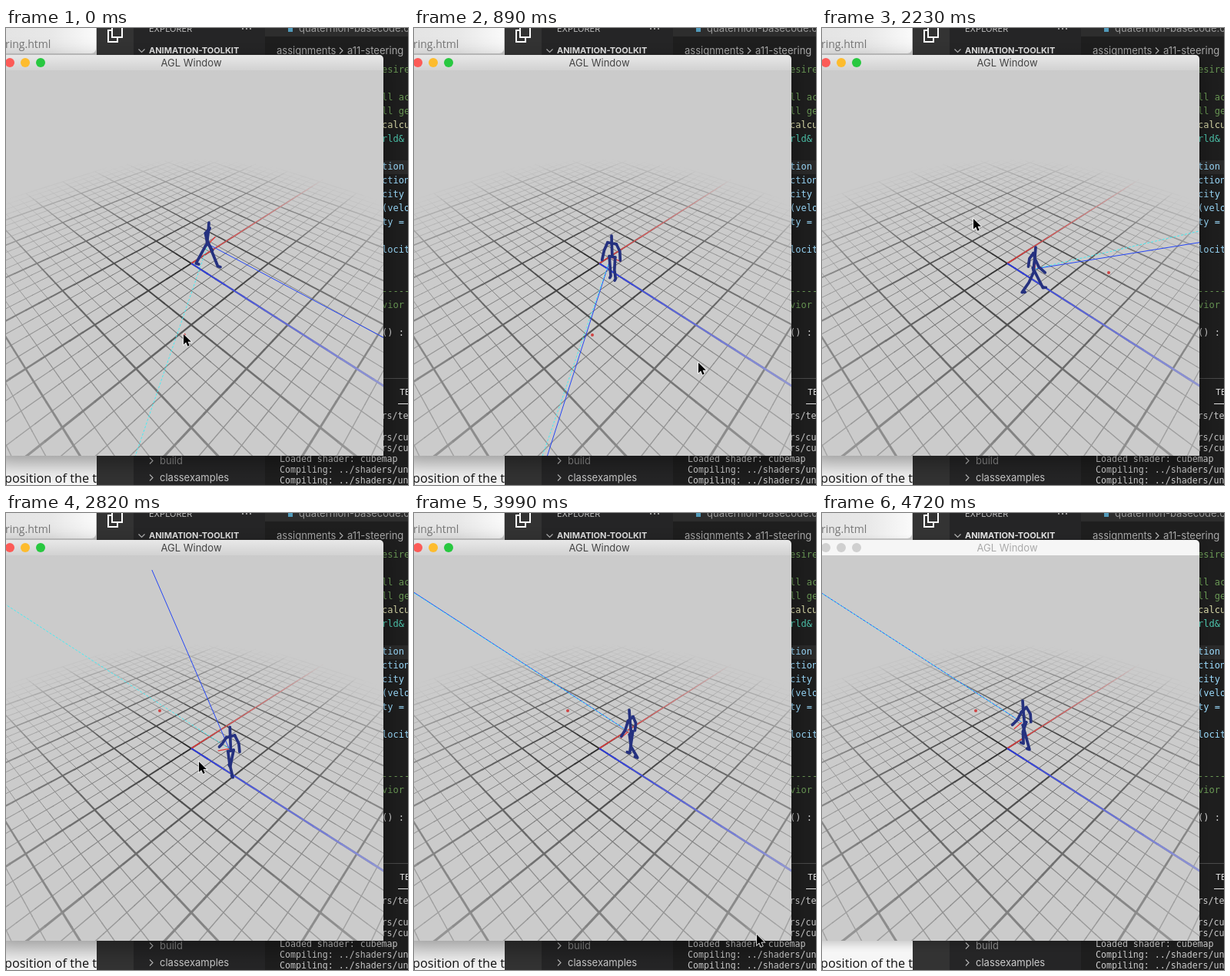
An HTML page with a canvas for the animation above (4820 ms loop, 523 by 594 pixels).

```html
<!DOCTYPE html>
<html lang="en">
<head>
<meta charset="utf-8">
<title>Steering demo</title>
<style>
  html, body { margin: 0; width: 100%; height: 100%; overflow: hidden; background: #1e1e1e; }
  canvas { display: block; }
</style>
</head>
<body>
<canvas id="stage" width="523" height="594"></canvas>
<script>
const W = 523, H = 594, LOOP = 4820;
const SANS = '"Inter", sans-serif', MONO = '"DejaVu Sans Mono", monospace';
const stage = document.getElementById('stage').getContext('2d');
let g = stage;

// Key poses: step, head x, head y, cursor x, cursor y
const keys = [
  [0, 264, 251, 231, 398], [6, 257, 268, 370, 435], [10, 253, 281, 372, 317],
  [15, 278, 283, 197, 248], [23, 298, 267, 350, 431], [27, 280, 254, 446, 548],
  [32, 261, 242, 520, 640]];

// Each click sets a target; the walker then turns toward it
const goals = [
  { step: -1, target: [232, 399], angle: 109 },
  { step: 10, target: [373, 318], angle: -12.9 },
  { step: 17, target: [200, 257], angle: -147.2 }];

// Hermite curve through the key poses
function poseAt(n) {
  const last = keys.length - 1;
  let i = 0;
  while (i < last - 1 && keys[i + 1][0] <= n) i++;
  const a = keys[i], b = keys[i + 1], span = b[0] - a[0], p = (n - a[0]) / span;
  const slope = (k, j) => {
    const u = keys[Math.max(0, k - 1)], v = keys[Math.min(last, k + 1)];
    return span * (v[j] - u[j]) / (v[0] - u[0]);
  };
  return [1, 2, 3, 4].map(j => {
    const d = b[j] - a[j], s = slope(i, j), e = slope(i + 1, j);
    return a[j] + p * (s + p * (3 * d - 2 * s - e + p * (s + e - 2 * d)));
  });
}

function headingAt(n) {
  let angle = 28;
  goals.forEach((goal, i) => {
    const until = Math.min(n, goals[i + 1]?.step ?? n);
    const steps = until - Math.max(0, goal.step);
    if (steps > 0) angle = goal.angle + (angle - goal.angle) * 0.5 ** steps;
  });
  return angle;
}

function rect(x, y, w, h, fill) {
  g.fillStyle = fill;
  g.fillRect(x, y, w, h);
}

function text(str, x, y, color, font, align = 'left') {
  g.fillStyle = color;
  g.font = font;
  g.textAlign = align;
  g.fillText(str, x, y);
}

function line(points, color, width = 1) {
  g.strokeStyle = color;
  g.lineWidth = width;
  g.beginPath();
  points.forEach(p => g.lineTo(p[0], p[1]));
  g.stroke();
}

function dot(x, y, r, fill) {
  g.fillStyle = fill;
  g.beginPath();
  g.arc(x, y, r, 0, 7);
  g.fill();
}

function gradient(x1, y1, x2, y2, ...colors) {
  const fill = g.createLinearGradient(x1, y1, x2, y2);
  colors.forEach((c, i) => fill.addColorStop(i / (colors.length - 1), c));
  return fill;
}

function chevron(x, y, down) {
  line(down ? [[x - 4, y - 2], [x, y + 2], [x + 4, y - 2]]
            : [[x - 2, y - 4], [x + 2, y], [x - 2, y + 4]], '#b8b8b8', 1.1);
}

function layer(paint) {
  const c = document.createElement('canvas');
  c.width = W;
  c.height = H;
  g = c.getContext('2d');
  paint();
  g = stage;
  return c;
}

function paintDesktop() {
  rect(0, 0, 118, H, '#f6f6f6');
  rect(0, 0, 118, 36, '#c8c8c8');
  g.beginPath();
  g.roundRect(-20, -20, 137, 53, 6);
  g.fillStyle = gradient(0, 0, 117, 0, '#e4e4e4', '#e8e8e8', '#fafafa');
  g.fill();
  text('ring.html', -1, 26, '#777', '14px "Open Sans", sans-serif');
  text('position of the t', 118, 591, '#111', '16.3px "Open Sans", sans-serif', 'right');

  rect(118, 0, 48, H, '#333333');
  rect(166, 0, 171, H, '#252526');
  rect(337, 0, 186, H, '#1e1e1e');
  rect(337, 0, 186, 11, '#2d2d2d');
  g.strokeStyle = '#fff';
  g.lineWidth = 2;
  g.strokeRect(138, -4, 13, 16);
  line([[138, 3], [133, 3], [133, 18], [145, 18], [145, 12]], '#fff', 2);

  text('EXPLORER', 186, 5, '#bbb', '11px ' + SANS);
  for (let x = 308; x < 320; x += 5) dot(x, 1, 1, '#bbb');
  chevron(176.5, 29.5, true);
  text('ANIMATION-TOOLKIT', 186, 33, '#e4e4e4', 'bold 11px ' + SANS);
  rect(367, 0, 6, 5, '#519aba');
  text('quaternion-basecode.cpp', 381, 5, '#999', '13px ' + SANS);
  text('assignments', 352, 34, '#a9a9a9', '13px ' + SANS);
  chevron(436, 29.5);
  text('a11-steering', 444, 34, '#a9a9a9', '13px ' + SANS);

  rect(491, 172, 32, 18, '#2a2a2a');
  const code = 'esire||ll ac|ll ge|calcu|rld&||tion|ction|city|(velo|ty =||locit|||-----|vior||() :';
  code.split('|').forEach((s, i) => {
    const color = i < 4 || i === 16 || i === 17 ? '#6a9955'
      : i === 4 ? '#dcdcaa' : i === 5 ? '#4ec9b0' : i < 16 ? '#9cdcfe' : '#d4d4d4';
    text(s, 489, 58 + 18 * i, color, '12px ' + MONO);
  });

  rect(337, 455, 186, 1, '#4a4a4a');
  text('TERMINAL', 512, 477, '#e7e7e7', '11px ' + SANS);
  rect(510, 488, 13, 1, '#e7e7e7');
  const log = ['te', '', 'cu', 'cu', '', 'un', 'un'];
  log.forEach((s, i) => text(i === 4 ? 'Loaded shader: cubemap' : s && 'Compiling: ../shaders/' + s,
    356, 508 + 14 * i, '#ccc', '11.6px ' + MONO));
  chevron(189, 562.5);
  text('build', 200, 567, '#8c8c8c', '13px ' + SANS);
  chevron(189, 584.5);
  text('classexamples', 200, 589, '#ccc', '13px ' + SANS);
}

// Ground point in major cells to [x, y, depth]
function project(x, z) {
  const r = 0.13 * (x + z), f = 0.13 * (x - z), d = 1 + 0.772 * f;
  return [241 + 386 * r / d, 306 - 245.5 * f / d, d];
}

// A ground line that fades into the background away from the centre
function gridLine(at, alongX, rgb, width, strength, from = -5) {
  const place = t => alongX ? project(t, at) : project(at, t);
  for (let k = from * 5; k < 26; k++) {
    const fade = strength * (1 - Math.hypot(at, (k + 0.5) / 5) / 5.2);
    if (fade <= 0) continue;
    const a = place(k / 5), b = place((k + 1.05) / 5);
    const color = rgb.map(v => Math.round(203 + (v - 203) * fade));
    line([a, b], `rgb(${color})`, width / a[2]);
  }
}

function paintGround() {
  rect(0, 55, 491, 501, '#cbcbcb');
  g.beginPath();
  g.rect(0, 55, 491, 501);
  g.clip();
  const dark = [20, 20, 20];
  for (const major of [false, true]) {
    for (let i = -20; i <= 20; i++) {
      if ((i % 4 === 0) !== major) continue;
      for (const alongX of [true, false])
        gridLine(i / 4, alongX, dark, major ? 1.8 : 0.8, major ? 0.9 : 0.7);
    }
  }
  gridLine(0, true, [225, 50, 50], 1.5, 0.95, 0);
  gridLine(0, false, [40, 55, 225], 1.8, 1, 0);
}

function drawFrame(active) {
  g.save();
  g.shadowColor = active ? 'rgba(0,0,0,.4)' : 'rgba(0,0,0,.2)';
  g.shadowBlur = active ? 30 : 12;
  g.shadowOffsetY = active ? 10 : 4;
  g.beginPath();
  g.roundRect(-20, 35, 511, 521, [5, 5, 0, 0]);
  g.fillStyle = active ? gradient(0, 35, 0, 55, '#e8e8e8', '#d2d2d2') : '#f6f6f6';
  g.fill();
  g.restore();
  ['#fc5b57', '#fdbc2e', '#28c840'].forEach((c, i) =>
    dot(5 + 20 * i, 45, 6, active ? c : '#d0d0d0'));
  text('AGL Window', 241, 50, active ? '#444' : '#aaa', '13px ' + SANS, 'center');
}

function ray([x, y], degrees, color) {
  const a = degrees * Math.PI / 180, dx = Math.cos(a), dy = Math.sin(a);
  const len = dy < 0 ? Math.min(700, (74 - y) / dy) : 700;
  line([[x, y], [x + dx * len, y + dy * len]], color);
}

function drawWalker(head, degrees, phase) {
  const a = degrees * Math.PI / 180, c = Math.cos(a), s = Math.sin(a);
  const hip = [head[0] - 3 * c, head[1] + 31 - 1.8 * s];
  const at = (fwd, side, up) =>
    [hip[0] + c * fwd - s * side, hip[1] + 0.6 * (s * fwd + c * side) - up];
  const limb = (...points) => line(points.map(p => at(...p)), '#25317f', 3.7);

  g.lineCap = g.lineJoin = 'round';
  limb([3, 0, 29], [2, 0, 17], [0, 0, 0]);
  limb([1, -6, 18], [1, 6, 18]);
  limb([0, -4, 0], [0, 4, 0]);
  for (const side of [-1, 1]) {
    const p = phase + (side > 0 ? Math.PI : 0);
    const thigh = 0.48 * Math.sin(p), shin = thigh - 0.6 * Math.max(0, Math.cos(p));
    const kx = 15 * Math.sin(thigh), ky = -15 * Math.cos(thigh);
    const fx = kx + 15 * Math.sin(shin), fy = ky - 15 * Math.cos(shin);
    limb([0, side * 4, 0], [kx, side * 4, ky], [fx, side * 4, fy], [fx + 4, side * 4, fy]);
    const arm = -0.5 * Math.sin(p), fore = arm + 0.35;
    const ex = 1 + 10 * Math.sin(arm), ey = 18 - 10 * Math.cos(arm);
    limb([1, side * 6, 18], [ex, side * 10, ey],
         [ex + 11 * Math.sin(fore), side * 11, ey - 11 * Math.cos(fore)]);
  }
  g.lineCap = 'butt';
  g.lineJoin = 'miter';
}

function drawCursor(x, y) {
  g.save();
  g.translate(x, y);
  g.scale(0.9, 0.9);
  const arrow = new Path2D('M0 0V15L3.5 11.8L6 17.5L8.6 16.3L6.2 10.8H11Z');
  g.strokeStyle = '#fff';
  g.lineWidth = 1.6;
  g.stroke(arrow);
  g.fillStyle = '#000';
  g.fill(arrow);
  g.restore();
}

const desktop = layer(paintDesktop);
const ground = layer(paintGround);

function draw(n) {
  const active = n < 29;
  const [hx, hy, cx, cy] = poseAt(n);
  const heading = headingAt(n);
  const goal = goals.findLast(item => item.step < n);

  g.drawImage(desktop, 0, 0);
  drawFrame(active);
  g.drawImage(ground, 0, 0);

  g.save();
  g.beginPath();
  g.rect(0, 55, 491, 501);
  g.clip();
  dot(...goal.target, 2, '#cf4545');
  const hip = [hx - 1, hy + 30];
  ray(hip, heading, '#2445f5');
  g.setLineDash([3, 2]);
  ray(hip, goal.angle, '#45eef5');
  g.setLineDash([]);
  const right = (heading - 80) * Math.PI / 180;
  line([hip, [hip[0] + 15 * Math.cos(right), hip[1] + 12 * Math.sin(right)]], '#e03a3a', 1.3);
  drawWalker([hx, hy], heading, 1.57 + 0.86 * n);
  g.restore();

  if (active) drawCursor(cx, cy);
}

function tick(now) {
  const t = now % LOOP;
  const n = t < 2525 ? t / 149 : 17 + (t - 2530) / 146;
  draw(Math.floor(n + 0.07));
  requestAnimationFrame(tick);
}
requestAnimationFrame(tick);
</script>
</body>
</html>
```
